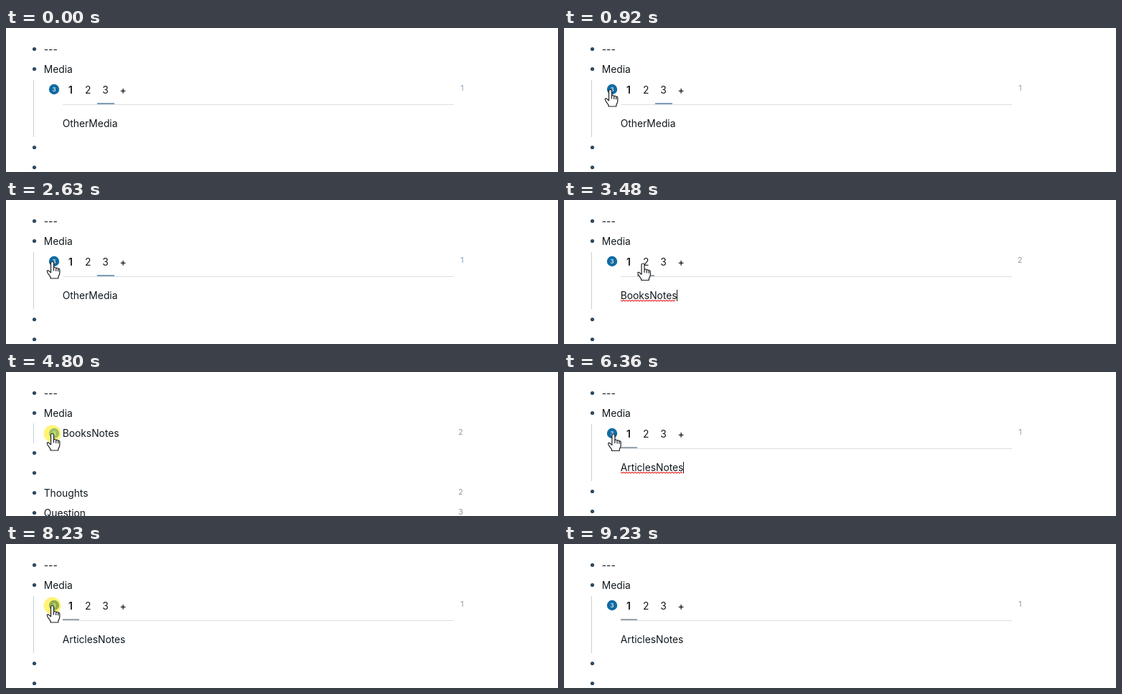
These frames come from a looping animation (769x202 px, 9630 ms). An HTML page with a canvas:

```html
<!DOCTYPE html>
<html lang="en">
<head>
<meta charset="utf-8">
<title>Outline with tabbed block</title>
<style>
  html, body { margin: 0; width: 100%; height: 100%; overflow: hidden; background: #fff; }
  canvas { display: block; }
</style>
</head>
<body>
<canvas id="stage" width="769" height="202"></canvas>
<script>
const ctx = document.getElementById('stage').getContext('2d');
const LOOP = 9630, PRESS = 150, LAG = 75;
const INK = '#10181e', BULLET = '#2f4a60', GREY = '#8f959a', BLUE = '#7d9db8', GUIDE = '#c3d1db';
const TOP = 29.5, ROW = 28;

const TABS = [
  { title: 'ArticlesNotes', count: '1' },
  { title: 'BooksNotes', count: '2' },
  { title: 'OtherMedia', count: '1' }
];
const tabX = i => 89.8 + 24.4 * i;

// Places the pointer visits
const BADGE = [64.5, 86.5], TAB1 = [85, 87], TAB2 = [110, 89], BLANK = [52, 87];
const ENTRY = [476, 178], BODY = [139, 124], EXIT = [670, 200];
const APPEAR = 150, VANISH = 9230;

const toggle = s => { s.open = !s.open; s.focus = false; };
const blur = s => { s.focus = false; };
const pick = tab => s => { s.tab = tab; s.focus = true; };

// Stops with an action are clicks; the others are resting points
const STOPS = [
  { at: 300, spot: BODY },
  { at: 860, spot: BADGE },
  { at: 1150, spot: BADGE, act: toggle },
  { at: 2080, spot: BADGE, act: toggle, lag: PRESS },
  { at: 2955, spot: TAB2, act: pick(1) },
  { at: 3870, spot: BADGE, act: toggle },
  { at: 4800, spot: BADGE, act: toggle },
  { at: 5740, spot: TAB1, act: pick(0), lag: 2 * PRESS },
  { at: 6520, spot: BLANK, act: blur },
  { at: 6760, spot: BADGE },
  { at: 7380, spot: BADGE, act: toggle },
  { at: 8150, spot: BADGE, act: toggle },
  { at: 9150, spot: EXIT }
];

const smooth = p => p * p * (3 - 2 * p);

// Replays the stops up to time t
function stateAt(t) {
  const s = { open: true, tab: 2, focus: false, pressed: false };
  let [x, y] = ENTRY, free = APPEAR;
  for (const { at, spot, act, lag = LAG } of STOPS) {
    const travel = 300 + 0.4 * Math.hypot(spot[0] - x, spot[1] - y);
    const start = Math.max(free, at - travel);
    if (t < start) break;
    const p = smooth(Math.min(1, (t - start) / (at - start)));
    x += (spot[0] - x) * p;
    y += (spot[1] - y) * p;
    free = act ? at + PRESS : at;
    if (act && t >= at + lag) act(s);
    s.pressed = Boolean(act) && t >= at && t < free;
  }
  return { ...s, x, y };
}

function text(str, x, y, { size = 13.8, weight = 400, color = INK, align = 'left' } = {}) {
  ctx.font = `${weight} ${size}px Inter, sans-serif`;
  ctx.fillStyle = color;
  ctx.textAlign = align;
  ctx.fillText(str, x, y);
}

function disc(x, y, r, color) {
  ctx.fillStyle = color;
  ctx.beginPath();
  ctx.arc(x, y, r, 0, Math.PI * 2);
  ctx.fill();
}

function rect(x, y, w, h, color) {
  ctx.fillStyle = color;
  ctx.fillRect(x, y, w, h);
}

const count = (str, x, y, color = GREY) => text(str, x, y, { size: 10.5, color, align: 'center' });

function row(y, label = '', refs = '') {
  disc(39.5, y, 2.6, BULLET);
  text(label, 52.7, y + 5.5);
  count(refs, 633.5, y + 2.5);
}

function badge(color) {
  disc(67, 86, 7.2, color);
  text('3', 67, 89.3, { size: 8, weight: 500, color: '#fff', align: 'center' });
}

function squiggle(x, y, width) {
  ctx.strokeStyle = '#e8302f';
  ctx.lineWidth = 1.1;
  ctx.beginPath();
  for (let i = 0; i <= width; i += 2) ctx.lineTo(x + i, y + (i % 4 ? 1 : -0.6));
  ctx.stroke();
}

function drawClosed(tab) {
  rect(38, 72, 1, ROW, GUIDE);
  badge('#2b95d6');
  text(tab.title, 78.7, 91);
  count(tab.count, 633.5, 88);
  const below = TOP + 3 * ROW;
  row(below);
  row(below + ROW);
  row(below + 2 * ROW, 'Thoughts', '2');
  row(below + 3 * ROW, 'Question', '3');
}

function drawOpen(index, focus) {
  const tab = TABS[index], fresh = index === 2;
  rect(38, 73, 1, 80, GUIDE);
  badge('#106ba3');
  TABS.forEach((_, i) =>
    text(i + 1, tabX(i), 92, { weight: i ? 400 : 600, align: 'center' }));
  text('+', tabX(3), 92, { weight: 500, align: 'center' });

  rect(79, 107, 545, 1, '#dadfe2');
  const left = Math.max(79, Math.round(tabX(index) - 12));
  rect(left, 105, Math.round(tabX(index) + 12) - left, 2, fresh ? BLUE : '#98a3ad');

  text(tab.title, 78.7, 139);
  if (focus) {
    const w = ctx.measureText(tab.title).width;
    squiggle(79, 141, w - 1);
    rect(Math.floor(78.7 + w), 126, 1, 16, '#111');
  }
  count(tab.count, 635.3, 88, fresh ? BLUE : GREY);
  row(167.5);
  row(167.5 + ROW);
}

const HAND = new Path2D('M-2 2a2 2 0 0 1 4 0V9c.2-1.5 3.2-1.4 3.2.6c.2-1.3 2.9-1.2 2.9.8' +
  'c.2-1.1 2.2-.9 2.2 1.2V16c0 3-2 4-2 6.2V23.5H-2.4V22c-.5-2-3.8-4.6-4.7-7.6' +
  'c-.6-2.2 1.2-2.8 2.6-1.2L-2 15.4Z');
const KNUCKLES = new Path2D('M2 9V13M5.2 9.6V13.4M8.1 10.4V13.8');
const ARROW = new Path2D('M0 0V16L3.8 12.5L6.3 18.3L8.8 17.2L6.3 11.6H11.4Z');
const BEAM = new Path2D('M-3.5-8.5H-1L0-7.5L1-8.5H3.5M0-7.5V7.5M-3.5 8.5H-1L0 7.5L1 8.5H3.5');

function drawPointer(x, y) {
  ctx.save();
  ctx.translate(x, y);
  ctx.lineWidth = 1.2;
  ctx.lineJoin = 'round';
  ctx.strokeStyle = '#1c1f22';
  ctx.fillStyle = '#fff';
  const outside = x <= 57 || x > 625;
  const onControl = !outside && x < 172 && y < 106;
  if (onControl || outside) {
    const shape = onControl ? HAND : ARROW;
    ctx.fill(shape);
    ctx.stroke(shape);
  }
  if (onControl) ctx.stroke(KNUCKLES);
  else if (!outside) ctx.stroke(BEAM);
  ctx.restore();
}

function draw(t) {
  const { open, tab, focus, pressed, x, y } = stateAt(t);
  rect(0, 0, 769, 202, '#fff');
  row(TOP, '---');
  row(TOP + ROW, 'Media');
  if (open) drawOpen(tab, focus);
  else drawClosed(TABS[tab]);

  if (pressed) disc(x, y, 12, 'rgba(255, 235, 0, .53)');
  if (t >= APPEAR && t < VANISH) drawPointer(x, y);
}

const origin = performance.now();
function tick() {
  draw((performance.now() - origin) % LOOP);
  requestAnimationFrame(tick);
}
tick();
</script>
</body>
</html>
```
